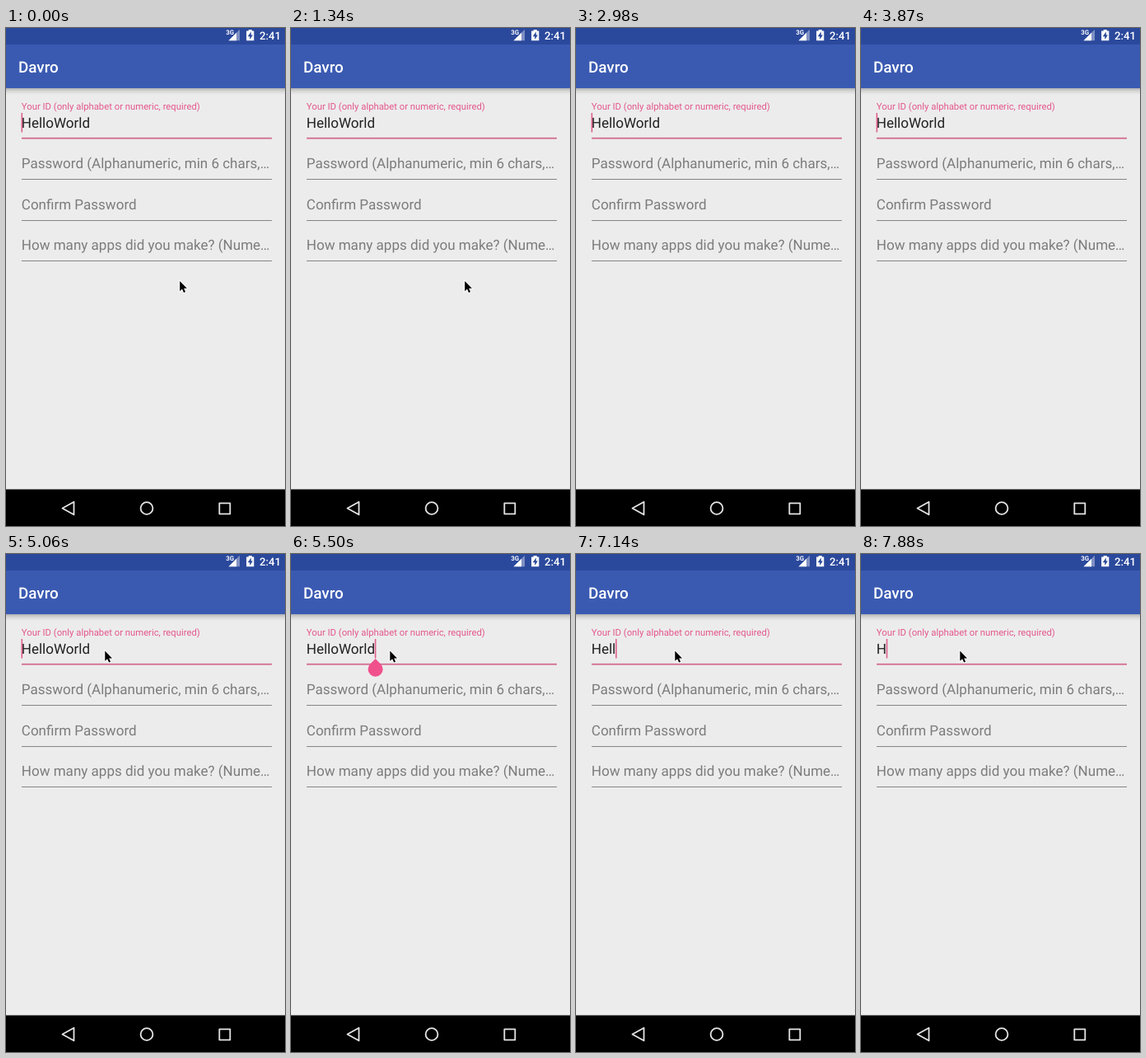
An HTML page that plays this animation: 339x604 px, repeating every 8000 ms.

```html
<!DOCTYPE html>
<html lang="en">
<head>
<meta charset="utf-8">
<title>Sign-up form</title>
<style>
  html, body { margin: 0; width: 100%; height: 100%; overflow: hidden; background: #ececec; }
  svg { display: block; width: 339px; height: 604px; }
  text { font-family: Roboto, "Noto Sans", sans-serif; text-rendering: geometricPrecision; white-space: pre; }
  .field { font-size: 17.04px; fill: #212121; }
  .hint { fill: #7c7c7c; }
  .rule { fill: #858585; }
  .nav { fill: none; stroke: #e4e4e4; stroke-width: 1.8; stroke-linejoin: round; }
</style>
</head>
<body>
<svg viewBox="0 0 339 604">
  <defs>
    <linearGradient id="shade" x1="0" y1="0" x2="0" y2="1">
      <stop offset="0" stop-color="#000" stop-opacity=".25"/>
      <stop offset=".45" stop-color="#000" stop-opacity=".09"/>
      <stop offset="1" stop-color="#000" stop-opacity="0"/>
    </linearGradient>
  </defs>
  <rect width="339" height="604" fill="#ececec"/>

  <rect y="73" width="339" height="8" fill="url(#shade)"/>
  <rect width="339" height="73" fill="#3a5ab2"/>
  <rect width="339" height="20" fill="#2b499c"/>
  <text x="15" y="54" font-size="18.83" font-weight="500" fill="#fff">Davro</text>

  <g fill="#fff">
    <text x="267.3" y="8" font-size="7.8" font-weight="700">3G</text>
    <path d="M270.5 15.3 L284 1.8 V15.3Z" fill-opacity=".4"/>
    <path d="M270.5 15.3 L280 5.8 V15.3Z"/>
    <path d="M294.7 2 H298.7 V3.4 H301.3 V15.3 H292.1 V3.4 H294.7Z"/>
    <path d="M297.8 4.6 L293.7 10.2 H296.2 V14 L300 8.6 H297.8Z" fill="#2b499c"/>
    <text x="308" y="13.8" font-size="13.2" font-weight="500">2:41</text>
  </g>

  <text x="18.8" y="99" font-size="11.3" fill="#e4588c">Your ID (only alphabet or numeric, required)</text>
  <rect x="19" y="132.8" width="304" height="1.8" fill="#d36d90"/>
  <g id="hints"></g>
  <text id="entry" class="field" x="18.8" y="121"></text>
  <rect id="caret" y="103" width="1.6" height="23.5" fill="#e0608e"/>
  <path id="handle" d="M102.6 127 L109 133.4 A9 9 0 1 1 96.2 133.4Z" fill="#f0508c"/>

  <rect y="559.5" width="339" height="45" fill="#000"/>
  <path class="nav" d="M68.5 582.5 L82.5 574.7 V590.3Z"/>
  <circle class="nav" cx="171" cy="582.5" r="7.4"/>
  <rect class="nav" x="259.3" y="576.3" width="13" height="13"/>

  <path id="pointer" d="M0 0 V12.2 L2.8 9.6 L4.8 14 L6.8 13.1 L4.9 8.8 H8.7Z"
        fill="#000" stroke="#fff" stroke-width="1.6" paint-order="stroke"/>
</svg>
<script>
  const LOOP = 8000, TICK = 148.7, LEFT = 18.8, WORD = "HelloWorld";
  const $ = id => document.getElementById(id);
  const entry = $("entry"), caret = $("caret"), handle = $("handle"), pointer = $("pointer");

  $("hints").innerHTML = [
    "Password (Alphanumeric, min 6 chars,…",
    "Confirm Password",
    "How many apps did you make? (Nume…"
  ].map((label, i) => {
    const y = 183 + i * 49.7;
    return `<text class="field hint" x="${LEFT}" y="${y - 13}">${label}</text>
            <rect class="rule" x="19" y="${Math.round(y)}" width="304" height="1"/>`;
  }).join("");

  const LEAVE = 11, GONE = 14, ENTER = 31, REST = 34, TAP = 36, ERASE = 42;
  const pauses = [45, 51, 52];

  const show = (el, on) => el.setAttribute("visibility", on ? "visible" : "hidden");
  const clamp = p => Math.min(1, Math.max(0, p));
  const easeOut = p => 1 - (1 - p) ** 1.5;
  const mix = (a, b, p) => a.map((v, i) => v + (b[i] - v) * p);

  // One letter goes per tick, except while the typist pauses.
  const lettersLeft = k => k < ERASE ? WORD.length
    : WORD.length - (k - ERASE + 1) + pauses.filter(p => p <= k).length;

  // The caret flips each beat; a tap or a key restarts it.
  function caretOn(k) {
    const beat = k < TAP ? (k + 1.03) / 3.34 : k < ERASE ? (k - TAP) / 3 : 0;
    return Math.floor(beat) % 2 === 0;
  }

  function pointerAt(k) {
    if (k < GONE) return mix([211.2, 307], [184, 46], clamp((k - LEAVE) / 2));
    if (k < ENTER) return null;
    return mix([207, 1], [120.3, 117.6], easeOut(clamp((k - ENTER) / (REST - ENTER))));
  }

  function draw(t) {
    const k = Math.floor((t + 8) / TICK);
    const word = WORD.slice(0, lettersLeft(k));
    if (entry.textContent !== word) entry.textContent = word;

    const end = k >= TAP ? entry.getComputedTextLength() : 0;
    caret.setAttribute("x", LEFT + end - 0.3);
    show(caret, caretOn(k));
    show(handle, k >= TAP && k < ERASE);

    const tip = pointerAt(k);
    show(pointer, tip);
    if (tip) pointer.setAttribute("transform", `translate(${tip})`);
  }

  const start = performance.now();
  function tick() {
    draw((performance.now() - start) % LOOP);
    requestAnimationFrame(tick);
  }
  tick();
</script>
</body>
</html>
```
